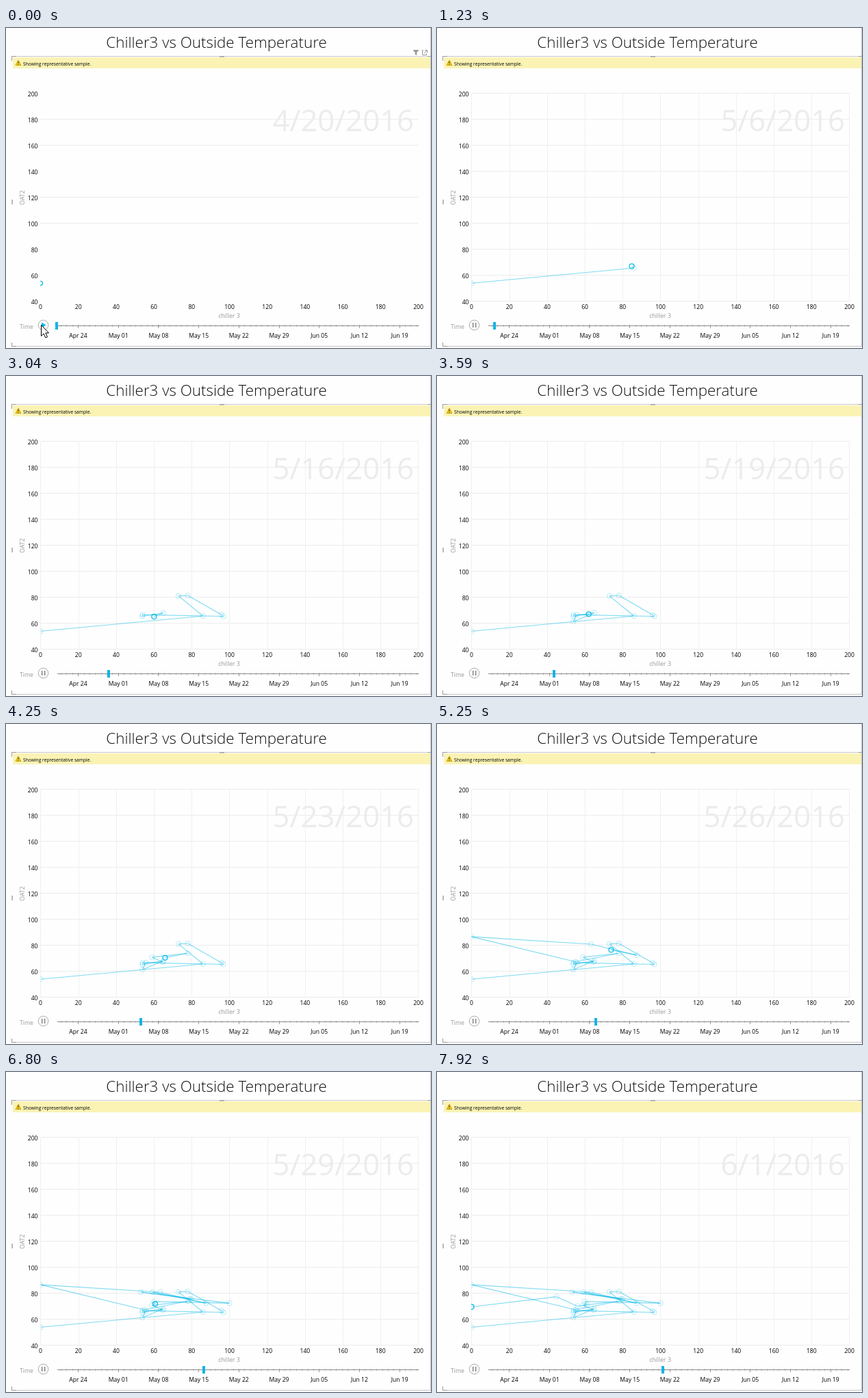
Animation, 621 px wide and 468 px high, one loop 8 s. Source, as an HTML page with a canvas:

```html
<!DOCTYPE html>
<html lang="en">
<head>
<meta charset="utf-8">
<title>Chiller3 vs Outside Temperature</title>
<style>
html, body { margin: 0; width: 100%; height: 100%; overflow: hidden; background: #fefefe; }
canvas { display: block; }
</style>
</head>
<body>
<canvas id="stage" width="621" height="468"></canvas>
<script>
const ctx = document.getElementById('stage').getContext('2d');
const FONT = '"Open Sans", "Noto Sans", sans-serif';
const LOOP = 8000, START = 1080, TICK = 139.6, STEP = 247, FIRST = 950;
const LEFT = 50.5, RIGHT = 602.5, TOP = 95.5, BOTTOM = 399.5;
const BLUE = '#01b8e8';

// Chart values to pixels
const px = v => LEFT + (RIGHT - LEFT) * v / 200;
const py = v => BOTTOM - (BOTTOM - TOP) * (v - 40) / 160;
const range = (from, to, fn) => Array.from({ length: to - from + 1 }, (_, i) => fn(from + i));

// Readings settle around 58, later swing ever wider around 73
const settle = k => [58 + 7 * Math.cos(2.2 * k), 65 + 3 * Math.cos(2.2 * k) - 2.5 * Math.sin(2.2 * k)];
const swing = k => {
  const c = Math.cos(0.8 * Math.PI * k);
  return [73 + (27 + 2.5 * k) * c, 77 - 4.7 * c];
};
const path = [
  [0, 53.8], [86, 65.5], [73, 81], [78, 81.3], [95.8, 66.4], [96.8, 65.3], [54, 66.5],
  ...range(-1, 3, settle),
  [59, 70.7], [78, 73.8], [55, 67.2], [0, 86.5],
  ...range(-6, 0, swing),
  [60, 73.6], [61, 71], [56, 70], [45, 77.3], [0, 69.5]
].map(([x, y]) => [px(x), py(y)]);

const pointAt = i => path[Math.min(i, path.length - 1)];

function rect(x, y, w, h, color) {
  ctx.fillStyle = color;
  ctx.fillRect(x, y, w, h);
}

function text(str, x, y, size, color, align = 'center', weight = 400) {
  ctx.font = `${weight} ${size}px ${FONT}`;
  ctx.textAlign = align;
  ctx.fillStyle = color;
  ctx.fillText(str, x, y);
}

const label = (str, x, y, align) => text(str, x, y, 8.6, '#000', align);

function poly(points, fill, stroke) {
  ctx.beginPath();
  points.forEach(([x, y]) => ctx.lineTo(x, y));
  ctx.closePath();
  ctx.fillStyle = fill;
  ctx.fill();
  if (stroke) {
    ctx.strokeStyle = stroke;
    ctx.lineWidth = 1;
    ctx.stroke();
  }
}

function line(points, color, width = 1) {
  ctx.beginPath();
  points.forEach(([x, y]) => ctx.lineTo(x, y));
  ctx.strokeStyle = color;
  ctx.lineWidth = width;
  ctx.stroke();
}

function ring([x, y], r, color, width = 1) {
  ctx.beginPath();
  ctx.arc(x, y, r, 0, 7);
  ctx.strokeStyle = color;
  ctx.lineWidth = width;
  ctx.stroke();
}

function drawFrame() {
  rect(0, 0, 621, 468, '#fefefe');
  text('Chiller3 vs Outside Temperature', 307.5, 28.5, 22.4, '#111', 'center', 300);
  rect(8, 41, 612, 1, '#c8c8c8');
  rect(10, 43, 610, 16, '#faf3b4');
  rect(620, 0, 1, 466, '#c4c4c4');
  rect(8, 465, 613, 1, '#c4c4c4');
  line([[8.5, 48], [8.5, 41.5], [15, 41.5]], '#999');
  line([[8.5, 460], [8.5, 465.5], [15, 465.5]], '#999');
  rect(312, 41, 7, 1.5, '#999');
  rect(616, 41, 5, 1, '#999');
  rect(8, 251, 2, 7, '#bbb');
  poly([[18, 47], [22, 54.5], [14, 54.5]], '#f5cf1b', '#c9a415');
  rect(17.5, 49, 1, 3, '#333');
  rect(17.5, 53, 1, 1, '#333');
  text('Showing representative sample.', 25, 55, 6.7, '#000', 'left');
}

function drawAxes(playing) {
  for (let v = 40; v <= 200; v += 20) {
    const y = py(v);
    if (playing || (v >= 100 && v < 200 && v !== 140))
      rect(LEFT, Math.floor(y), RIGHT - LEFT, 1, '#ececec');
    label(v, 46.5, y + 4, 'right');
  }
  for (let v = 0; v <= 200; v += 20) {
    const x = px(v);
    if (playing) rect(Math.floor(x + 0.4), TOP, 1, BOTTOM - TOP, '#f0f0f0');
    label(v, x, 411);
  }
  text('chiller 3', 326, 424, 8.7, '#999');
  ctx.save();
  ctx.translate(27, 248);
  ctx.rotate(-Math.PI / 2);
  text('OAT2', 0, 0, 8.7, '#999');
  ctx.restore();
}

// Dates run fast at first, then more readings share a day
function drawDate(step) {
  const n = Math.floor(step);
  const day = n ? Math.round(Math.min(4.4 + 1.43 * n, 16.5 + 0.55 * n)) : -10;
  const d = new Date(Date.UTC(2016, 3, 30 + day));
  text(`${d.getUTCMonth() + 1}/${d.getUTCDate()}/2016`, 596, 151, 43.6, '#ececec', 'right');
}

function drawTrail(step) {
  const n = Math.floor(step), f = step - n;
  const [ax, ay] = pointAt(n), [bx, by] = pointAt(n + 1);
  const head = [ax + (bx - ax) * f, ay + (by - ay) * f];
  ctx.save();
  ctx.beginPath();
  ctx.rect(50, 60, 560, 345);
  ctx.clip();
  for (let i = 0; i <= n && step > 0; i++) {
    ctx.globalAlpha = 0.5;
    line([pointAt(i), i < n ? pointAt(i + 1) : head], BLUE, 1.1);
    ctx.globalAlpha = 0.28;
    ring(pointAt(i), 3.6, BLUE);
  }
  ctx.globalAlpha = 1;
  ring(head, step > 0 ? 3.5 : 3, BLUE, 1.2);
  ctx.restore();
}

function drawSlider(step, playing) {
  text('Time', 20, 440, 8.7, '#999', 'left');
  rect(75, 435, 528, 1, '#8c8c8c');
  for (let x = 80.5; x < 603; x += 8.385) rect(Math.floor(x), 434, 1, 3, '#aaa');
  for (let week = 0; week < 9; week++) {
    const x = 105.5 + week * 58.7;
    const d = new Date(Date.UTC(2016, 3, 24 + week * 7));
    const month = d.toLocaleString('en-US', { month: 'short', timeZone: 'UTC' });
    rect(Math.floor(x), 434, 1, 5, '#999');
    label(`${month} ${String(d.getUTCDate()).padStart(2, '0')}`, x, 453);
  }
  rect(Math.round(72 + step * 9.06), 430, 4, 11, '#12b4e8');
  ring([54.5, 434.5], 7.3, '#aaa');
  if (playing) {
    rect(52, 431, 1.3, 7, '#777');
    rect(56, 431, 1.3, 7, '#777');
  } else {
    poly([[52, 430.5], [58.5, 434.5], [52, 438.5]], BLUE);
  }
}

// Header icons and the mouse pointer
function drawHover() {
  poly([[594.5, 32], [603.5, 32], [600.2, 36], [600.2, 40], [597.8, 39], [597.8, 36]], '#999');
  line([[610, 32.5], [608.5, 32.5], [608.5, 39.5], [614.5, 39.5], [614.5, 37]], '#999');
  line([[611, 37], [615, 33]], '#999');
  line([[612, 32.5], [615.5, 32.5], [615.5, 36]], '#999');
  poly([[51.5, 434.5], [51.5, 450.5], [55, 447], [57.8, 453], [60.5, 451.8],
    [57.8, 446], [62.5, 446]], '#fff', '#000');
}

function draw(t) {
  const playing = t >= START;
  const shown = START + Math.floor((t - START) / TICK + 0.4) * TICK;
  const step = playing ? (shown - FIRST) / STEP : 0;
  drawFrame();
  drawAxes(playing);
  drawDate(step);
  drawTrail(step);
  drawSlider(step, playing);
  if (!playing) drawHover();
}

const origin = performance.now();
function loop() {
  draw((performance.now() - origin) % LOOP);
  requestAnimationFrame(loop);
}
loop();
</script>
</body>
</html>
```
